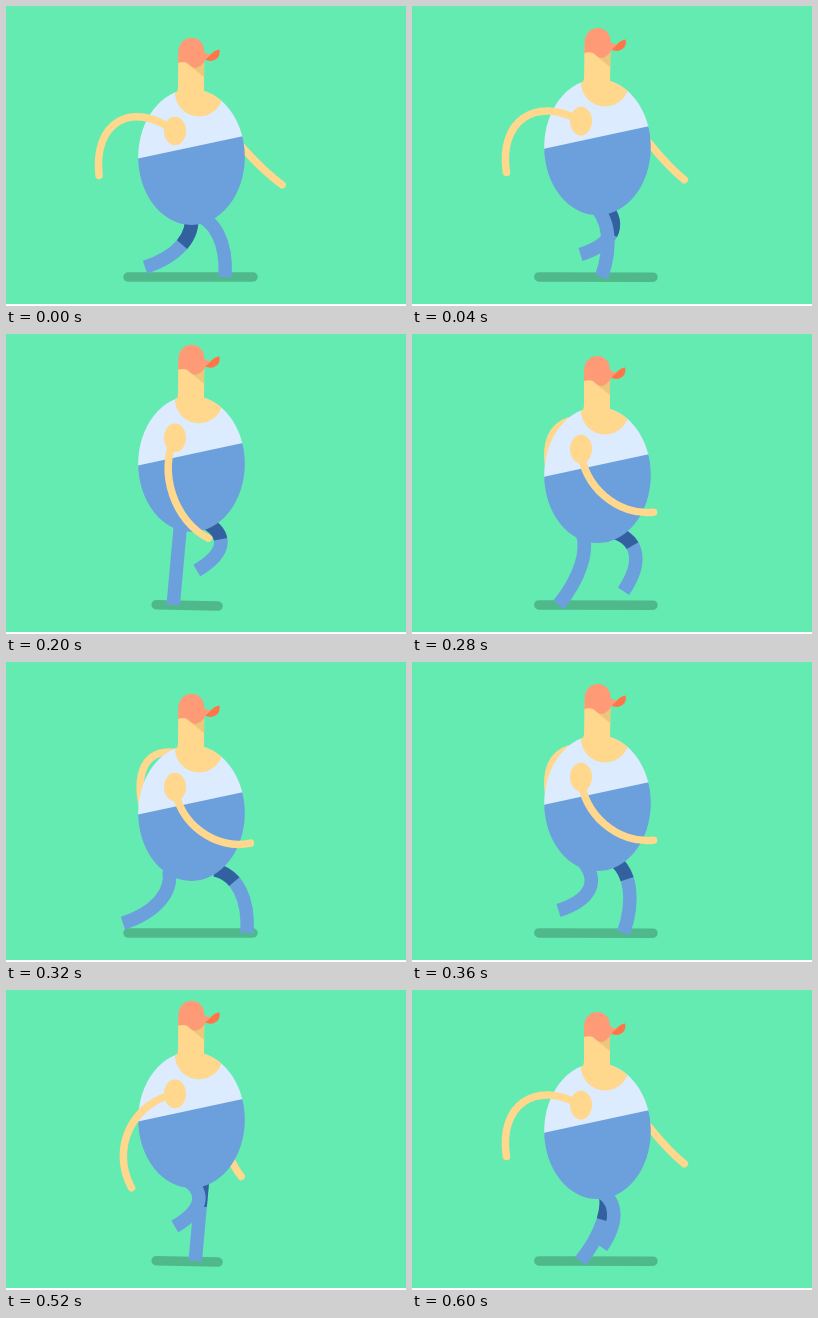
Animation of 400 by 300 pixels, one loop 0.64 s. Source, as an HTML page with a canvas:

```html
<!DOCTYPE html>
<html>
<head>
<meta charset="utf-8">
<style>
html, body { margin: 0; height: 100%; overflow: hidden; background: #fff; }
canvas { display: block; }
</style>
</head>
<body>
<canvas id="stage" width="400" height="300"></canvas>
<script>
const ctx = document.getElementById('stage').getContext('2d');
const STEPS = 16, STEP_MS = 40, GROUND = 271, LEG_LENGTH = 82;
const SKIN = '#ffd78d', BLUE = '#6ca0dd', NAVY = '#33619f', SHIRT = '#ddebff';
const CAP = '#ff9a76', BRIM = '#ff7548', SHADE = '#ecc67c', SHADOW = '#50b98b', GRASS = '#64ebb2';

function fill(color, d) {
  ctx.fillStyle = color;
  ctx.fill(new Path2D(d));
}

function oval(color, x, y, rx, ry) {
  ctx.fillStyle = color;
  ctx.beginPath();
  ctx.ellipse(x, y, rx, ry, 0, 0, 7);
  ctx.fill();
}

function stroke(color, width, cap) {
  ctx.strokeStyle = color;
  ctx.lineWidth = width;
  ctx.lineCap = cap;
  ctx.stroke();
}

// A curve of the given length straight down from (x, y), turned by angle and bulging to its left.
function limb(x, y, angle, length, bulge, near, far) {
  ctx.save();
  ctx.translate(x, y);
  ctx.rotate(-angle);
  ctx.beginPath();
  ctx.moveTo(0, 0);
  ctx.bezierCurveTo(-bulge, length * near, -bulge, length * far, 0, length);
  ctx.restore();
}

function drawArm(x, y, degrees, length, bulge) {
  limb(x, y, degrees * Math.PI / 180, length, bulge, .25, .75);
  stroke(SKIN, 7.5, 'round');
}

// The foot lands at phase 0, trails behind at 8 and swings forward again; the knee takes up the slack.
function drawLeg(phase, center, lift, dark) {
  const stride = (Math.abs(phase - 8) / 4 - 1) ** 3;
  const rise = 39 * Math.max(0, Math.sin((phase - 7.3) / 8.7 * Math.PI));
  const x = center + 12 * stride, y = 208 - lift;
  const dx = center - 7 + 51 * stride - x, dy = GROUND - rise - y;
  const length = Math.hypot(dx, dy);
  const slack = Math.sqrt(Math.max(0, LEG_LENGTH ** 2 - length ** 2));
  limb(x, y, Math.atan2(dx, dy), length, -.42 * slack, .2, .58);
  stroke(BLUE, 13.5, 'butt');
  if (!dark) return;
  ctx.setLineDash([dark, 999]);
  stroke(NAVY, 13.5, 'butt');
  ctx.setLineDash([]);
}

function drawShadow(k) {
  const e = (1 - Math.cos(k * Math.PI / 4)) / 2;
  ctx.beginPath();
  ctx.moveTo(122 + 33 * e, GROUND - .3 * e);
  ctx.lineTo(247 - 41 * e, GROUND + 1.3 * e);
  stroke(SHADOW, 9.5, 'round');
}

function drawHead(k) {
  const lean = (1 + Math.cos((k - 2.6) * Math.PI / 4)) / 100;
  ctx.save();
  ctx.transform(1, 0, -lean, 1, 88 * lean, 0);
  fill(SKIN, 'M172 50H198V90H169Q172 86 172 80Z');
  fill(SHADE, 'M179 56L198 71V52Z');
  fill(BRIM, 'M197 54C204 51 205 45 213 43.5C215 50 210 55 204 55Q200 55 197 52Z');
  fill(CAP, 'M172 57V47C172 27 198 27 198 46Q201 49 205 48L200 53Q196 60 190 62Q186 62 182 57.5Q177 55 172 57Z');
  ctx.restore();
}

function drawBody() {
  ctx.save();
  ctx.beginPath();
  ctx.ellipse(185.5, 151, 53.3, 68, 0, 0, 7);
  ctx.clip();
  fill(SHIRT, 'M130 80H242V130L130 154Z');
  oval(SKIN, 193, 86.5, 24, 24);
  fill(BLUE, 'M130 153L242 129V222H130Z');
  ctx.restore();
}

function draw(k) {
  const swing = Math.cos(k * Math.PI / 8);
  const lift = 22.6 * (1 - (1 - k % 8 / 4) ** 2);
  const reach = 16 * (1 - swing ** 2);

  ctx.fillStyle = GRASS;
  ctx.fillRect(0, 0, 400, 298);
  drawShadow(k);

  drawArm(212, 110 - lift, 48 * swing - 5, 91 + 3 * swing + reach * .6, 22 - 32 * swing + 15 * swing ** 2);
  drawLeg((k + 8) % STEPS, 197, lift, 28 + 5 * swing);
  drawLeg(k, 175, lift);

  ctx.save();
  ctx.translate(0, -lift);
  drawBody();
  drawHead(k);
  drawArm(169, 125, -3.2 - 56.5 * swing, 91 - 3 * swing + reach, 30 + 11 * swing + 8 * swing ** 2);
  oval(SKIN, 169, 125, 11, 14.3);
  ctx.restore();
}

const start = performance.now();
function tick() {
  draw(Math.floor((performance.now() - start) / STEP_MS) % STEPS);
  requestAnimationFrame(tick);
}
tick();
</script>
</body>
</html>
```
